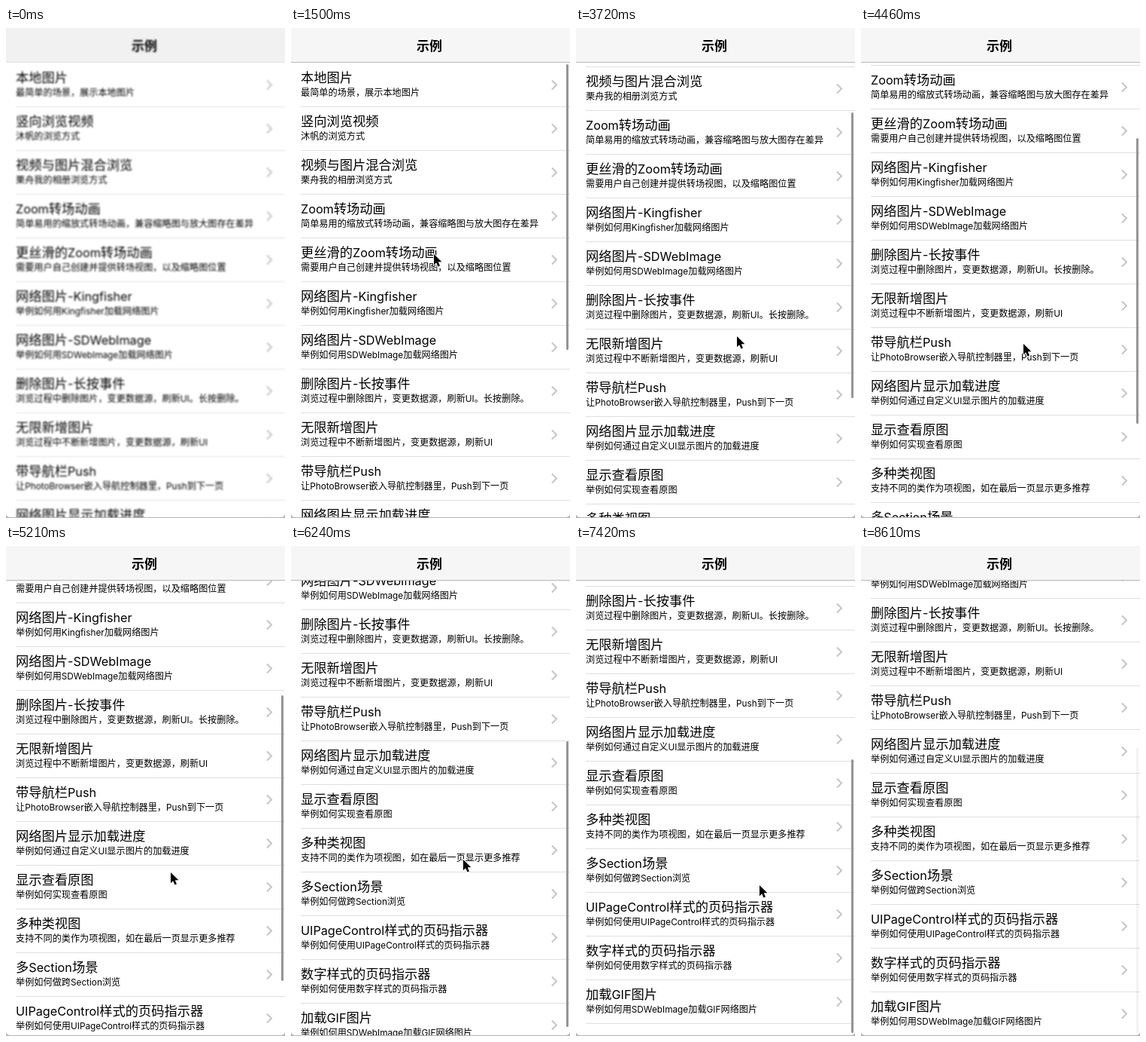
Animation, 371 px wide and 650 px high, one loop 8900 ms. Source, as an HTML page:

```html
<!DOCTYPE html>
<html lang="zh-CN">
<head>
<meta charset="utf-8">
<style>
  html, body { margin: 0; width: 100%; height: 100%; overflow: hidden; background: #b4b4b4; }
  #screen {
    position: absolute; left: 0; top: 0; width: 371px; height: 649px;
    overflow: hidden; background: #fff; border-radius: 0 0 5px 5px;
    font-family: "Noto Sans CJK SC", "Noto Sans CJK", sans-serif; color: #000;
  }
  header {
    position: absolute; left: 0; top: 0; width: 371px; height: 46px;
    background: #f6f6f6; border-bottom: 1px solid #b8b8b8; box-sizing: border-box;
  }
  h1 {
    margin: 0; position: absolute; left: 0; top: 11px; width: 368px;
    font-size: 17px; font-weight: 700; line-height: 24px; text-align: center;
  }
  #list { position: absolute; left: 0; top: 46px; width: 371px; }
  .row { position: relative; height: 58px; white-space: nowrap; }
  .row::after {
    content: ""; position: absolute; left: 13px; right: 0; top: 58px;
    height: 1px; background: #dfdfe1;
  }
  .title, .sub { position: absolute; left: 13px; }
  .title { top: 6px; font-size: 17.25px; line-height: 25px; }
  .sub { top: 30px; font-size: 12.17px; line-height: 19px; }
  .row span { font-family: Inter, sans-serif; line-height: 0; }
  .title span { font-size: .94em; }
  .sub span { font-size: .97em; }
  .row svg { position: absolute; left: 345px; top: 22px; }
  #bar { position: absolute; left: 366px; width: 3px; border-radius: 2px; background: #959595; }
  #cursor { position: absolute; left: -2px; top: -2px; }
  .soft #list, .soft h1 { filter: blur(.9px); }
  .soft header { background: #f1f1f1; border-color: #e4e4e4; }
</style>
</head>
<body>
<div id="screen">
  <div id="list"></div>
  <header><h1>示例</h1></header>
  <div id="bar"></div>
  <svg id="cursor" width="16" height="22" viewBox="-2 -2 16 22">
    <path d="M0 0V14.2L3.2 11.3L5.5 16.6L8 15.5L5.8 10.3H10.4Z" fill="#000"
      stroke="#fff" stroke-width="1.8" stroke-linejoin="round" paint-order="stroke"/>
  </svg>
</div>
<script>
const rows = [
  ['本地图片', '最简单的场景，展示本地图片'],
  ['竖向浏览视频', '沐帆的浏览方式'],
  ['视频与图片混合浏览', '栗舟我的相册浏览方式'],
  ['Zoom转场动画', '简单易用的缩放式转场动画，兼容缩略图与放大图存在差异'],
  ['更丝滑的Zoom转场动画', '需要用户自己创建并提供转场视图，以及缩略图位置'],
  ['网络图片-Kingfisher', '举例如何用Kingfisher加载网络图片'],
  ['网络图片-SDWebImage', '举例如何用SDWebImage加载网络图片'],
  ['删除图片-长按事件', '浏览过程中删除图片，变更数据源，刷新UI。长按删除。'],
  ['无限新增图片', '浏览过程中不断新增图片，变更数据源，刷新UI'],
  ['带导航栏Push', '让PhotoBrowser嵌入导航控制器里，Push到下一页'],
  ['网络图片显示加载进度', '举例如何通过自定义UI显示图片的加载进度'],
  ['显示查看原图', '举例如何实现查看原图'],
  ['多种类视图', '支持不同的类作为项视图，如在最后一页显示更多推荐'],
  ['多Section场景', '举例如何做跨Section浏览'],
  ['UIPageControl样式的页码指示器', '举例如何使用UIPageControl样式的页码指示器'],
  ['数字样式的页码指示器', '举例如何使用数字样式的页码指示器'],
  ['加载GIF图片', '举例如何用SDWebImage加载GIF网络图片']
];
const LOOP = 8900, MAX_SCROLL = 383, LAST = 48;

// [time, step], [step, offset] and [step, x, y]
const clock = [[1500, 0], [2380, 6], [2680, 8], [3720, 15], [3870, 16], [4910, 23], [5210, 25],
  [6100, 31], [6240, 32], [6830, 36], [7270, 39], [7420, 40], [8320, 46], [8610, 48]];
const scroll = [[0, 0], [1, 2], [6, 35], [15, 111], [25, 261], [32, 368], [36, 398], [40, 399],
  [43, 389], [46, 383]];
const pointer = [[0, 190, 300], [6, 196, 338], [15, 214, 409], [25, 219, 433], [32, 229, 416],
  [36, 233, 431], [42, 250, 460], [46, 295, 530], [47, 325, 590]];

const $ = id => document.getElementById(id);
const latin = s => s.replace(/[\w-]+/g, '<span>$&</span>');

$('list').innerHTML = rows.map(([title, sub]) => `<div class="row">
  <div class="title">${latin(title)}</div><div class="sub">${latin(sub)}</div>
  <svg width="12" height="16"><path d="M2 1.5L8 7.5L2 13.5" fill="none" stroke="#c5c5c9" stroke-width="2"/></svg>
</div>`).join('');

function lerp(keys, at, col = 1) {
  const i = keys.findIndex(k => k[0] > at);
  if (i === 0) return keys[0][col];
  if (i < 0) return keys[keys.length - 1][col];
  const a = keys[i - 1], b = keys[i];
  return a[col] + (b[col] - a[col]) * (at - a[0]) / (b[0] - a[0]);
}

function draw(t) {
  const idle = t < 1500;
  const step = idle ? -1 : Math.floor(lerp(clock, t) + 1e-6);
  const y = idle ? 0 : Math.round(lerp(scroll, step));
  const over = Math.max(0, y - MAX_SCROLL);

  $('screen').className = idle ? 'soft' : '';
  $('list').style.transform = `translateY(${-y}px)`;

  const bar = $('bar').style;
  bar.top = 48 + .573 * (y - over) + over + 'px';
  bar.height = 379 - over + 'px';
  bar.opacity = idle ? 0 : step === LAST ? .12 : step === LAST - 1 ? .55 : 1;

  const cursor = $('cursor').style;
  cursor.display = idle || step === LAST ? 'none' : '';
  cursor.transform = `translate(${Math.round(lerp(pointer, step))}px, ${Math.round(lerp(pointer, step, 2))}px)`;
}

const start = performance.now();
function tick() {
  draw((performance.now() - start) % LOOP);
  requestAnimationFrame(tick);
}
tick();
</script>
</body>
</html>
```
